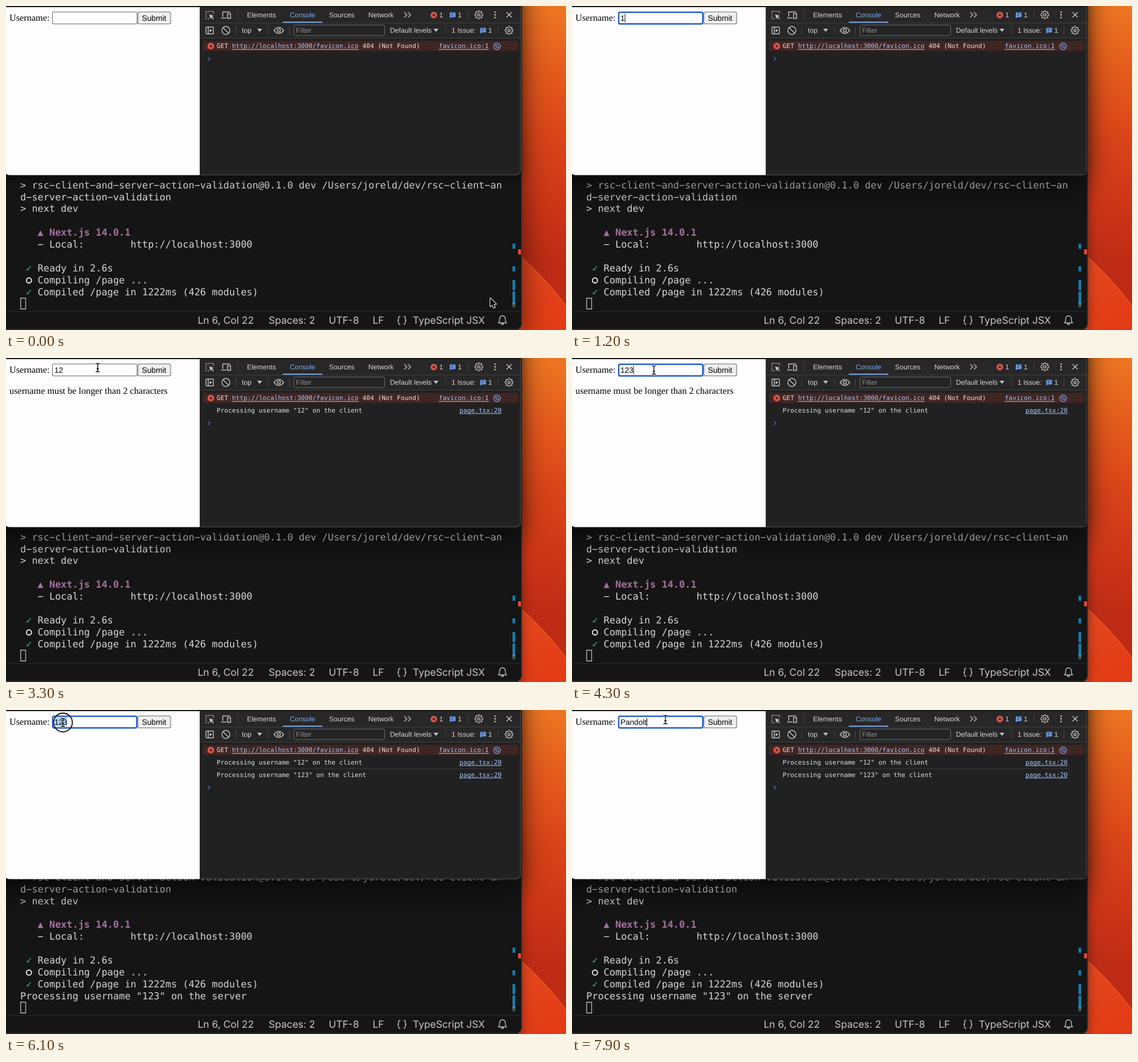
Animation, 983 px wide and 570 px high, one loop 8 s. Source, as an HTML page with a canvas:

```html
<!DOCTYPE html>
<html lang="en">
<head>
<meta charset="utf-8">
<title>Form validation on client and server</title>
<style>
html, body { margin: 0; width: 100%; height: 100%; overflow: hidden; background: #151515; }
canvas { display: block; width: 983px; height: 570px; }
</style>
</head>
<body>
<canvas id="stage"></canvas>
<script>
const W = 983, H = 570, LOOP = 8000, STEP = 100;
const canvas = document.getElementById('stage');
const c = canvas.getContext('2d');
const dpr = window.devicePixelRatio || 1;
canvas.width = W * dpr;
canvas.height = H * dpr;

const MONO = '"DejaVu Sans Mono", monospace';
const SANS = '"Liberation Sans", sans-serif';
const SERIF = '"Liberation Serif", serif';
const INTER = 'Inter, sans-serif';
const CELL = 10.19, ROW = 20.9;
const ICON = '#c3c3c3', BLUE = '#7cacf8', RED = '#e0584a', LINK = '#a8c7fa';

// time, x, y of the pointer
const PATH = [
  [100, 850, 514], [700, 110, 31], [1400, 110, 31], [1800, 261, 19], [2400, 261, 19],
  [3300, 161, 17], [3600, 130, 21], [4200, 130, 21], [4700, 262, 22], [5300, 262, 22],
  [5900, 100, 22], [7600, 100, 22], [7900, 164, 17]
];
const CLICKS = [[800, 1000], [2000, 2200], [3600, 3800], [4900, 5100], [6000, 6300]];
const TYPING = [[1100, 1400], [3900, 4200], [6400, 7600]];
const FOCUS = [[800, 2000], [3600, 4900], [6000, 8000]];
const EDITS = [
  [0, ''], [1100, '1'], [1300, '12'], [4000, '123'], [6500, 'P'], [6600, 'Pa'], [6800, 'Pan'],
  [7000, 'Pand'], [7200, 'Pando'], [7400, 'Pandol'], [7500, 'Pandolt']
];

const during = (spans, t) => spans.find(([a, b]) => t >= a && t < b);
const browserActive = t => t >= 800;

function rect(x, y, w, h, fill) {
  c.fillStyle = fill;
  c.fillRect(x, y, w, h);
}
function box(x, y, w, h, r, fill, stroke, lw = 1) {
  c.beginPath();
  c.roundRect(x, y, w, h, r);
  if (fill) { c.fillStyle = fill; c.fill(); }
  if (stroke) { c.strokeStyle = stroke; c.lineWidth = lw; c.stroke(); }
}
function circle(x, y, r, fill, stroke, lw = 1) {
  c.beginPath();
  c.arc(x, y, r, 0, Math.PI * 2);
  if (fill) { c.fillStyle = fill; c.fill(); }
  if (stroke) { c.strokeStyle = stroke; c.lineWidth = lw; c.stroke(); }
}
function lines(d, color, lw = 1.3) {
  c.strokeStyle = color;
  c.lineWidth = lw;
  c.stroke(new Path2D(d));
}
function shape(d, color) {
  c.fillStyle = color;
  c.fill(new Path2D(d));
}
function text(s, x, y, size, family, color, weight = '') {
  c.font = `${weight} ${size}px ${family}`;
  c.fillStyle = color;
  c.fillText(s, x, y);
  return c.measureText(s).width;
}
function fade(x0, y0, x1, y1, stops) {
  const g = c.createLinearGradient(x0, y0, x1, y1);
  stops.forEach(([p, col]) => g.addColorStop(p, col));
  return g;
}
// A window's body; the active window casts the larger shadow.
function pane(right, bottom, radius, active) {
  c.save();
  c.shadowColor = `rgba(0,0,0,${active ? 0.6 : 0.4})`;
  c.shadowBlur = (active ? 50 : 20) * dpr;
  c.shadowOffsetY = (active ? 18 : 8) * dpr;
  box(-100, -100, right + 100, bottom + 100, radius, '#151515');
  c.restore();
}

function wallpaper() {
  rect(900, 0, 83, H, fade(970, 0, 925, 450, [
    [0, '#ee7722'], [0.25, '#e55b1d'], [0.5, '#db4519'], [0.8, '#cb3417'], [1, '#bd2b15']
  ]));
  shape('M900 437 Q948 480 983 527 V570 H900 Z', fade(905, 440, 970, 570, [[0, '#e5491d'], [1, '#e23a15']]));
  lines('M900 437 Q948 480 983 527', '#e95c2c', 1.2);
}

// The terminal font has wide hyphens, so they are drawn as minus signs.
function term(s, col, y, color = '#d6d6d6', weight = '') {
  text(s.replaceAll('-', '\u2212'), 25 + col * CELL, y, 16.93, MONO, color, weight);
}

function terminal(t) {
  const served = t >= 5100;
  pane(905.5, 569.5, 10, !browserActive(t));
  box(-100, -100, 1005, 669, 10, null, '#444');
  const y = i => 320.6 + ROW * (i - (served ? 1 : 0));
  term('> rsc-client-and-server-action-validation@0.1.0 dev /Users/joreld/dev/rsc-client-an', 0, y(0));
  term('d-server-action-validation', 0, y(1));
  term('> next dev', 0, y(2));
  term('▲ Next.js 14.0.1', 3, y(4), '#a6709f', 'bold');
  term('- Local:        http://localhost:3000', 3, y(5));
  term('✓', 1, y(7), '#3fb984', 'bold');
  term('Ready in 2.6s', 3, y(7));
  circle(40.3, y(8) - 5, 4.5, null, '#e6e6e6', 2);
  term('Compiling /page ...', 3, y(8));
  term('✓', 1, y(9), '#3fb984', 'bold');
  term('Compiled /page in 1222ms (426 modules)', 3, y(9));
  if (served) term('Processing username "123" on the server', 0, y(10));
  box(25.7, 514, 8.8, 19, 0, null, '#bdbdbd', 1.3);

  [[418, 9], [458, 9], [482, 18], [502, 20]].forEach(([my, h]) => rect(889, my, 5, h, '#1a78a6'));
  rect(889, 522, 5, 3, '#5a8a98');
  rect(889, 525, 5, 5, '#46545a');
  rect(899, 428, 5, 9, '#e2492f');

  rect(0, 537, 904, 1, '#2a2a2a');
  [['Ln 6, Col 22', 336.5], ['Spaces: 2', 461], ['UTF-8', 566.5], ['LF', 643.5], ['TypeScript JSX', 714]]
    .forEach(([s, x]) => text(s, x, 559.3, 17.4, INTER, '#c8c8c8'));
  lines('M692 546 Q689 546 689 549 V551 Q689 553 687 553 Q689 553 689 555 V557 Q689 560 692 560 ' +
        'M698 546 Q701 546 701 549 V551 Q701 553 703 553 Q701 553 701 555 V557 Q701 560 698 560', '#c8c8c8', 1.3);
  lines('M864.5 557.5 H878.5 L876.5 553.5 V550 A5 5 0 0 0 866.5 550 V553.5 Z M869.5 558 A2 2.5 0 0 0 873.5 558', '#c8c8c8', 1.3);
}

function page(t, pos) {
  rect(0, 2, 340, 296, '#fdfdfd');
  text('Username:', 6, 26, 16.3, SERIF, '#000');
  const focus = during(FOCUS, t);
  const [edited, value] = EDITS.filter(e => e[0] <= t).pop();
  if (focus) box(82, 11, 147.5, 20.5, 2.5, '#fff', '#2259c4', 2.4);
  else box(81.5, 10.5, 148.5, 21, 2, '#fff', '#6c6c6c', 1.1);

  const selected = t >= 6100 && t < 6500;
  c.font = `13.55px ${SANS}`;
  const end = 85 + c.measureText(value).width;
  if (selected) rect(85, 13, end - 85, 16, '#b4d5fe');
  text(value, 85, 25.6, 13.55, SANS, '#000');
  if (focus && !selected && (t - Math.max(focus[0], edited)) % 1000 < 500) rect(end, 14, 1, 14.5, '#000');

  const hover = pos[0] > 231 && pos[0] < 289 && pos[1] > 10 && pos[1] < 32;
  box(231.5, 10.5, 57.5, 21, 3, hover ? '#e2e2e2' : '#efefef', '#6c6c6c', 1.1);
  text('Submit', 238.5, 25.6, 13.75, SANS, '#000');
  if (t >= 2200 && t < 5000) text('username must be longer than 2 characters', 6, 63.3, 16.3, SERIF, '#000');
}

function gear(x, y) {
  c.beginPath();
  for (let i = 0; i <= 64; i++) {
    const a = i / 64 * Math.PI * 2;
    const r = 6.2 + Math.max(-0.8, Math.min(0.8, Math.cos(a * 8) * 1.4));
    c.lineTo(x + r * Math.cos(a), y + r * Math.sin(a));
  }
  c.closePath();
  c.strokeStyle = ICON;
  c.lineWidth = 1.3;
  c.stroke();
  circle(x, y, 2.2, null, ICON, 1.3);
}
function errorDot(x, y) {
  circle(x, y, 5.8, RED);
  lines(`M${x - 2} ${y - 2} l4 4 m0 -4 l-4 4`, '#2b1a18', 1.2);
}
function bubble(x, y) {
  shape(`M${x} ${y - 4.5} h10 v8 h-7.5 l-2.5 2.5 z`, '#6c9df0');
  lines(`M${x + 2} ${y - 2} h6 M${x + 2} ${y + 0.7} h4`, '#24334f', 1);
}
function label(s, x, y, color = '#d6d6d6') {
  text(s, x, y, 12.2, SANS, color);
}
function code(s, x, y, color = '#e0e0e0') {
  return text(s, x, y, 11.18, MONO, color);
}
function link(s, x, y) {
  const w = code(s, x, y, LINK);
  rect(x, y + 1.4, w, 1, LINK);
}

function devtools(t) {
  rect(340, 2, 563, 296, '#212121');
  rect(340, 2, 563, 54, '#272727');
  rect(341, 29.5, 562, 1, '#414141');
  rect(341, 56, 562, 1, '#414141');
  rect(340, 2, 1, 296, '#2c2c2c');

  c.setLineDash([2, 1.6]);
  lines('M356 22 H351 V9.5 H364 V14', ICON, 1.4);
  c.setLineDash([]);
  shape('M356.5 14.5 L365 17.5 L361.6 19 L365 22.4 L363.8 23.4 L360.5 20.2 L359 23 Z', ICON);
  lines('M380.5 19 V10.5 H394 M378 21.3 H387 M389 13.5 H394.2 V21.8 H389 Z', ICON, 1.5);
  [[406, 8], [811, 8], [403, 36], [460, 36], [497, 36], [771, 36], [863, 36]]
    .forEach(([x, y]) => rect(x, y, 1, 15, '#4a4a4a'));

  label('Elements', 423, 20);
  label('Console', 498, 20, BLUE);
  label('Sources', 567, 20);
  label('Network', 636, 20);
  rect(486, 27.5, 69, 2, BLUE);
  lines('M699 11 l4.7 4.5 l-4.7 4.5 M705.5 11 l4.7 4.5 l-4.7 4.5', ICON);
  errorDot(751, 16);
  label('1', 760.5, 20.3);
  bubble(779, 16);
  label('1', 793, 20.3);
  gear(830, 15.5);
  [10.7, 15.5, 20.3].forEach(y => circle(858.5, y, 1.4, ICON));
  lines('M878.7 11 l9 9 m0 -9 l-9 9', ICON, 1.5);

  box(351, 37, 13, 12, 1, null, ICON, 1.4);
  lines('M355 37 V49', ICON, 1.4);
  shape('M357.5 40 L361.8 43 L357.5 46 Z', ICON);
  circle(386, 43, 7, null, ICON, 1.4);
  lines('M381.2 38.2 l9.6 9.6', ICON, 1.4);
  label('top', 414, 47);
  shape('M441 40 h8.5 l-4.25 5.5 z', ICON);
  lines('M470.5 43 Q479 32.5 487.5 43 Q479 53.5 470.5 43 Z', ICON, 1.4);
  circle(479, 43, 2.6, null, ICON, 1.4);
  box(505.5, 33.5, 159, 18.5, 3, '#242424', '#6e6e6e');
  label('Filter', 509, 47.3, '#8c8c8c');
  label('Default levels', 674, 47);
  shape('M750.5 40 h8.5 l-4.25 5.5 z', ICON);
  label('1 Issue:', 782, 47);
  bubble(832.5, 43);
  label('1', 846.5, 47);
  gear(883, 43);

  box(345, 61.5, 555, 17.5, 5, '#402623');
  errorDot(359.5, 70.5);
  code('GET', 369.8, 74.4, '#f3dcd8');
  link('http://localhost:3000/favicon.ico', 396.8, 74.4);
  code('404 (Not Found)', 625.8, 74.4, '#f3dcd8');
  link('favicon.ico:1', 759.7, 74.4);
  circle(862, 71, 5.8, null, BLUE, 1.2);
  lines('M860.3 74.5 V67.8 l-2 2 m2 -2 l1.6 2 M863.8 67.5 V74.2 l-1.7 -2 m1.7 2 l2 -2', BLUE, 1);

  const logs = [[2200, '12'], [5000, '123']].filter(l => l[0] <= t);
  logs.forEach(([, name], i) => {
    const y = 95.9 + i * 21.8;
    if (i) rect(370, 102.5, 504, 1, '#3d3d3d');
    code(`Processing username "${name}" on the client`, 369.8, y);
    link('page.tsx:20', 796, y);
  });
  lines(`M354.5 ${89.8 + logs.length * 21.6} l3.4 3.2 l-3.4 3.2`, '#4f80cf', 1.1);
}

function browser(t, pos) {
  pane(903.5, 297.5, 8, browserActive(t));
  c.save();
  c.beginPath();
  c.roundRect(-2, -20, 905.5, 317.5, 8);
  c.clip();
  page(t, pos);
  devtools(t);
  c.restore();
  lines('M341 297 H895 Q903.2 297 903.2 289 V0', '#555', 1);
  rect(0, 0, 904, 1.5, '#151515');
}

function pointerAt(t) {
  const i = PATH.findIndex(p => p[0] >= t);
  if (i < 0) return PATH[PATH.length - 1].slice(1);
  if (i === 0) return PATH[0].slice(1);
  const a = PATH[i - 1], b = PATH[i];
  const u = (t - a[0]) / (b[0] - a[0]);
  const e = u * u * (3 - 2 * u);
  return [a[1] + (b[1] - a[1]) * e, a[2] + (b[2] - a[2]) * e];
}

function pointer(t, [x, y]) {
  if (during(TYPING, t)) return;
  if (during(CLICKS, t)) circle(x, y, 16.5, null, '#111', 1.8);
  c.save();
  c.translate(x, y);
  if (x > 81 && x < 230 && y > 10 && y < 33) {
    const beam = 'M-3.5 -7.5 Q0 -7.5 0 -5.5 Q0 -7.5 3.5 -7.5 M0 -5.5 V5.5 M-3.5 7.5 Q0 7.5 0 5.5 Q0 7.5 3.5 7.5 M-2 2 H2';
    lines(beam, 'rgba(255,255,255,.8)', 3);
    lines(beam, '#000', 1.4);
  } else {
    const arrow = 'M0 0 V14.5 L3.4 11.4 L5.8 17 L8.3 16 L5.9 10.5 H10.5 Z';
    c.lineJoin = 'round';
    lines(arrow, '#fff', 2);
    shape(arrow, '#000');
  }
  c.restore();
}

function draw(t) {
  c.setTransform(dpr, 0, 0, dpr, 0, 0);
  c.textRendering = 'geometricPrecision';
  rect(0, 0, W, H, '#151515');
  const pos = pointerAt(t);
  wallpaper();
  terminal(t);
  browser(t, pos);
  pointer(t, pos);
}

let start = null;
function tick(now) {
  if (start === null) start = now;
  draw(Math.floor((now - start) % LOOP / STEP) * STEP);
  requestAnimationFrame(tick);
}
draw(0);
requestAnimationFrame(tick);
</script>
</body>
</html>
```
